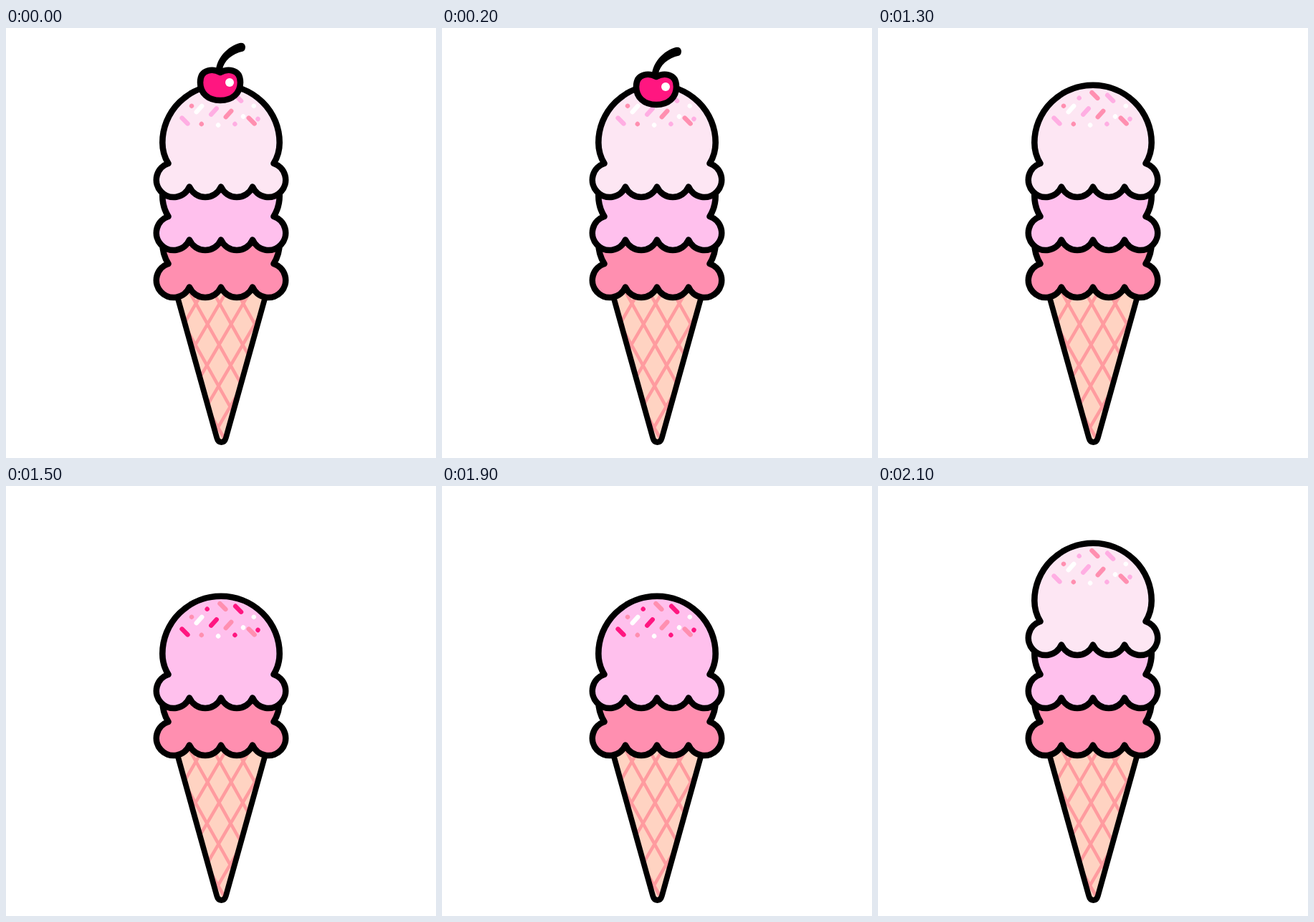
Recreate the animation shown at these times as an HTML page. Size 600x600 px, loop 2.3 s.

```html
<!DOCTYPE html>
<html lang="en">
<head>
<meta charset="utf-8">
<title>Ice cream</title>
<style>
  html, body { margin: 0; width: 100%; height: 100%; overflow: hidden; background: #fff; }
  svg { display: block; width: 100%; height: 100%; }
  .ink { stroke: #000; stroke-width: 8.6; stroke-linejoin: round; stroke-linecap: round; }
  .cone { stroke-width: 7.8; }
</style>
</head>
<body>
<svg viewBox="0 0 600 600">
  <defs>
    <path id="conePath" d="M233 353 L294.2 572 Q295.8 578 300.5 578 Q305.2 578 306.8 572 L368 353"/>
    <clipPath id="coneClip"><use href="#conePath"/></clipPath>
  </defs>
  <use href="#conePath" fill="#ffd3c2"/>
  <g id="waffle" clip-path="url(#coneClip)" stroke="#ff9b9f" stroke-width="4.5"></g>
  <use href="#conePath" class="ink cone" fill="none"/>
  <g id="scoops"></g>
  <g id="cherry">
    <path class="ink" fill="#ff1680" d="M299 62 C290 57 271 56 271 76 C271 91 282 101 299 101 C316 101 327 91 327 76 C327 56 308 57 299 62 Z"/>
    <path d="M293 58 C295 41 309 26 326 21 Q333 20 334 26 Q334 31 331 32.5 C315 36 304 46 302 58 Z"/>
    <circle cx="312" cy="76" r="6" fill="#fff"/>
  </g>
</svg>
<script>
const NS = 'http://www.w3.org/2000/svg';
const byId = id => document.getElementById(id);

function add(parent, tag, attrs) {
  const node = document.createElementNS(NS, tag);
  for (const key in attrs) node.setAttribute(key, attrs[key]);
  return parent.appendChild(node);
}

// Two families of parallel lines, clipped to the cone.
for (let k = -7; k <= 7; k++) {
  for (const slope of [0.56, -0.585]) {
    const at = y => 297.3 + slope * (y - 442) + 33 * k;
    add(byId('waffle'), 'line', { x1: at(350), y1: 350, x2: at(590), y2: 590 });
  }
}

// Four lobes along the hem, then the dome back over the top.
const LOBE = 'a24 24 0 0 0 44 0';
const SCOOP = `M226.5 189 A24.1 24.1 0 1 0 256 221.6 ${LOBE} ${LOBE}` +
  ' A24.1 24.1 0 1 0 373.5 189' +
  ' Q381.7 176 381.7 160 A81.7 80.2 0 0 0 218.3 160 Q218.3 176 226.5 189 Z';

// Sprinkles lie in three bent rows. Letters pick the colour
// (a, b or white); capitals are rods, the others dots.
const ROWS = [
  { kinds: 'baBAw', x: 259, gap: 21.7, y: c => 94 + 3.7 * (c - 2) ** 2, lean: 45 },
  { kinds: 'WABwa', x: 269.5, gap: 20.5, y: c => 113 + 3.5 * c, lean: -48 },
  { kinds: 'AbwaB', x: 249.5, gap: 23.3, y: c => 135.5 - 1.5 * (c - 2) ** 2, lean: 45 }
];

function addSprinkles(g, colours) {
  for (const { kinds, x, gap, y, lean } of ROWS) {
    [...kinds].forEach((kind, c) => {
      const half = kind < 'a' ? 5.6 : 0;
      add(g, 'path', {
        d: `M${-half} 0 H${half}`,
        transform: `translate(${x + gap * c} ${y(c)}) rotate(${lean})`,
        stroke: colours[kind.toLowerCase()],
        'stroke-width': 6.4, 'stroke-linecap': 'round'
      });
    });
  }
}

function makeScoop(dy, fill, a, b) {
  const g = add(byId('scoops'), 'g', { transform: `translate(0 ${dy})` });
  add(g, 'path', { d: SCOOP, fill, class: 'ink' });
  addSprinkles(g, { a, b, w: '#fff' });
  return g;
}

const HOT = '#ff1680', ROSE = '#ff8fb0', PINK = '#ffc0ed', PALE = '#fde6f3';

// Bottom to top.
const scoops = [
  makeScoop(140, ROSE, HOT, PINK),
  makeScoop(74, PINK, HOT, ROSE),
  makeScoop(0, PALE, '#ffaee3', ROSE)
];

const LOOP = 2300, BEAT = 200, CHERRY_END = 1300;
const cherry = byId('cherry');

function show(node, on) {
  node.setAttribute('visibility', on ? 'visible' : 'hidden');
}

// The cherry hops twice and rests; then scoops drop to one and build up again.
function draw(ms) {
  const t = ms % LOOP;
  const hasCherry = t < CHERRY_END;
  const hop = Math.min(Math.floor(t / BEAT), 3);
  const beat = Math.floor((t - CHERRY_END) / BEAT);
  const count = hasCherry ? 3 : 1 + Math.abs(beat - 2);

  scoops.forEach((scoop, i) => show(scoop, i < count));
  show(cherry, hasCherry);
  cherry.setAttribute('transform', `translate(0 ${hop % 2 ? 6 : 0})`);
}

const start = performance.now();
function tick() {
  draw(performance.now() - start);
  requestAnimationFrame(tick);
}
tick();
</script>
</body>
</html>
```
